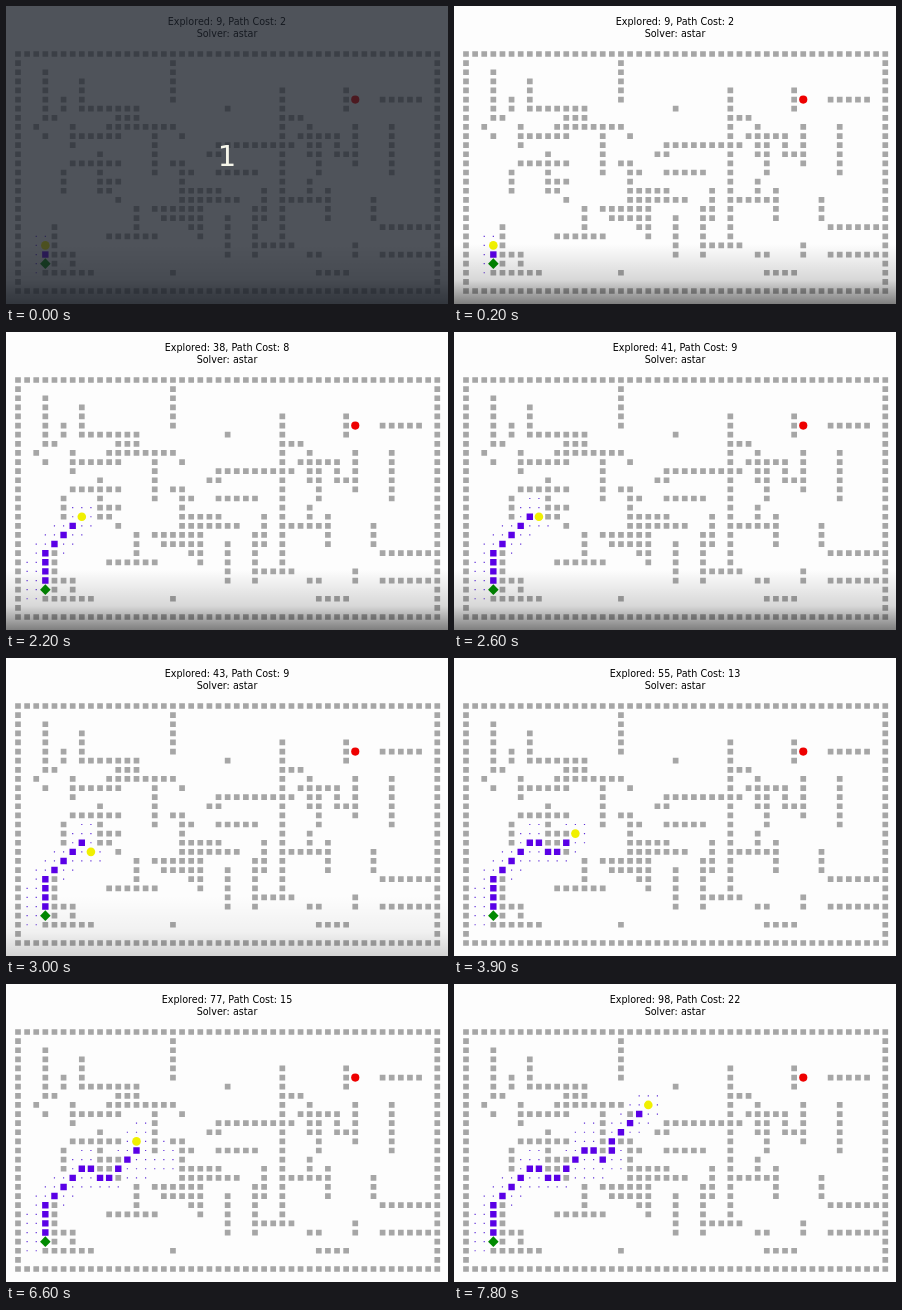
Write an HTML page that moves like this. It is 442 px wide and 298 px high and loops after 8 s.

```html
<!DOCTYPE html>
<html lang="en">
<head>
<meta charset="utf-8">
<title>A* maze search</title>
<style>
  html, body { margin: 0; width: 100%; height: 100%; overflow: hidden; background: #fdfdfd; }
  svg { display: block; }
  text { font-family: "DejaVu Sans", sans-serif; text-anchor: middle; }
</style>
</head>
<body>
<svg width="442" height="298" viewBox="0 0 442 298">
  <defs>
    <linearGradient id="shade" x2="0" y2="1">
      <stop offset="0" stop-opacity="0"/>
      <stop offset=".6" stop-opacity=".15"/>
      <stop offset="1" stop-opacity=".5"/>
    </linearGradient>
  </defs>
  <rect width="442" height="298" fill="#fdfdfd"/>
  <g font-size="9.6">
    <text id="stats" x="221" y="19"></text>
    <text x="221" y="31">Solver: astar</text>
  </g>
  <path id="walls" fill="#a6a6a6"/>
  <path id="dots" fill="#6030d8"/>
  <path id="trail" fill="#5a00e6"/>
  <path id="start" fill="#008a00"/>
  <circle id="goal" r="4.1" fill="#ee0000"/>
  <circle id="current" r="4.3" fill="#f0f000"/>
  <rect id="bar" y="238" width="442" height="60" fill="url(#shade)"/>
  <g id="countdown">
    <rect width="442" height="298" fill="rgb(28,33,42)" fill-opacity=".77"/>
    <text x="221" y="160" font-size="29" fill="#f6f6ea">1</text>
  </g>
</svg>
<script>
const COLS = 47, ROWS = 27, PITCH = 9.115, LOOP = 8000;
const START = { x: 3, y: 23 }, GOAL = { x: 37, y: 5 };
const $ = id => document.getElementById(id);
const px = c => 12 + c * PITCH, py = r => 48 + r * PITCH;
const key = (x, y) => y * COLS + x;

// Walls as strokes on the grid: M x y starts one, H and V extend it.
const westWalls = `M17 1V5 M3 2V7H4 M7 3V6H13V7H11 M5 5V6 M2 8 M6 8V10V9H11 M3 9 M10 8H17
  M15 9V13 M18 9 M9 11 M6 12H11 M5 13V15 M9 13V14H11H10V15H9 M11 16
  M17 12H18V13H19H18V16H24 M18 15H22 M13 17V19 M15 17H20V20 M16 18H19V19
  M4 19V23V22H6V23 M10 20H15 M3 24H8 M17 24`;
const eastWalls = `M23 6 M36 4V6 M40 5H44 M21 11H22V10H30 M22 13H26
  M29 4V7H31H29V21H30H26V22V17H27V15V18 M29 16H34V15V18 M31 9H35V11H37V8V12
  M32 8V11H33V10V13 M41 8V13 M32 14V15 M39 16V18 M23 18V22 M40 19H46 M40 22H46
  M37 21V22 M32 22H33 M33 24H36`;
const border = `M0 0H${COLS - 1}V${ROWS - 1}H0V0`;

function buildWalls(strokes) {
  const cells = new Map();
  let x, y;
  const mark = () => cells.set(key(x, y), { x, y });
  for (const [, cmd, a, b] of strokes.matchAll(/([MHV])(\d+)(?: (\d+))?/g)) {
    if (cmd === 'M') { x = +a; y = +b; }
    while (cmd === 'H' && x !== +a) { mark(); x += Math.sign(a - x); }
    while (cmd === 'V' && y !== +a) { mark(); y += Math.sign(a - y); }
    mark();
  }
  return cells;
}

// A* on eight neighbours, unit cost, straight-line heuristic.
function search(walls, limit) {
  const root = { ...START, cost: 0, f: 0 };
  const found = [root], seen = new Set([key(root.x, root.y)]);
  let open = [root];
  const steps = [];
  while (open.length && steps.length < limit) {
    const node = open.reduce((best, n) => n.f < best.f ? n : best);
    open = open.filter(n => n !== node);
    for (let dy = -1; dy <= 1; dy++) for (let dx = -1; dx <= 1; dx++) {
      const x = node.x + dx, y = node.y + dy, k = key(x, y);
      if (walls.has(k) || seen.has(k)) continue;
      const cost = node.cost + 1;
      const next = { x, y, cost, parent: node, f: cost + Math.sqrt((GOAL.x - x) ** 2 + (GOAL.y - y) ** 2) };
      seen.add(k);
      found.push(next);
      open.push(next);
    }
    steps.push({ node, explored: found.length });
  }
  return { found, steps };
}

const squares = (cells, size) => cells.map(({ x, y }) =>
  `M${px(x) - size / 2} ${py(y) - size / 2}h${size}v${size}h${-size}z`).join('');

function place(id, { x, y }) {
  $(id).setAttribute('cx', px(x));
  $(id).setAttribute('cy', py(y));
}

// Time at which each expansion appears; equal times are shown as one jump.
const times = [0, 500, 600, 1000, 1000, 1200, 1400, 1600, 1900, 2200, 2400, 2600, 2800, 3000, 3200,
  3300, 3400, 3600, 3900, 4200, 4200, 4400, 4600, 4800, 5200, 5200, 5400, 5600, 5800,
  6200, 6300, 6400, 6600, 6800, 7200, 7200, 7400, 7600, 7800];
const FIRST = 2;

const walls = buildWalls(border + westWalls + eastWalls);
const { found, steps } = search(walls, times.length + FIRST);
$('walls').setAttribute('d', squares([...walls.values()], 5.7));
$('start').setAttribute('d', `M${px(START.x)} ${py(START.y) - 5.3}l5.3 5.3l-5.3 5.3l-5.3 -5.3z`);
place('goal', GOAL);

let shown = -1;
function showStep(index) {
  if (index === shown) return;
  shown = index;
  const { node, explored } = steps[index];
  const trail = [];
  for (let n = node.parent; n && n.parent; n = n.parent) trail.push(n);
  $('dots').setAttribute('d', squares(found.slice(0, explored), 1.2));
  $('trail').setAttribute('d', squares(trail, 6.4));
  place('current', node);
  $('stats').textContent = `Explored: ${explored}, Path Cost: ${node.cost}`;
}

function draw(now) {
  const t = now % LOOP;
  showStep(times.filter(s => s <= t).length - 1 + FIRST);
  $('bar').setAttribute('opacity', Math.max(0, Math.min(1, (3200 - t) / 600)));
  $('countdown').setAttribute('display', t < 200 ? 'inline' : 'none');
  requestAnimationFrame(draw);
}
draw(0);
</script>
</body>
</html>
```
